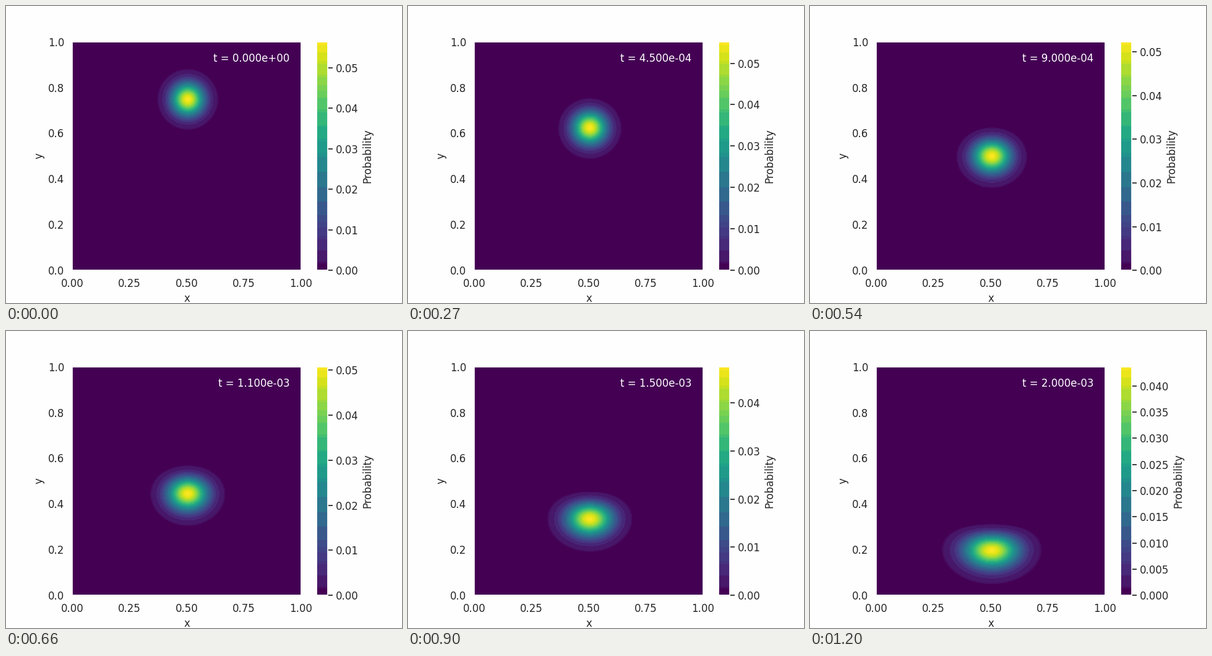
These frames come from a looping animation (640 by 480 pixels, 1.23 s). A matplotlib script:

```python
import numpy as np
import matplotlib.pyplot as plt
from matplotlib.animation import FuncAnimation
from matplotlib.colors import ListedColormap

FRAMES, INTERVAL = 41, 30
N, H, DT = 199, 0.005, 2.5e-5      # inner grid points, spacing, time step
STEPS_PER_FRAME = 2
SIGMA, MOMENTUM = 0.05, 200
PAPER, INK = "#fefefe", "0.15"

plt.rcParams.update({
    "font.family": "DejaVu Sans", "font.size": 12,
    "figure.facecolor": PAPER, "axes.edgecolor": PAPER,
    "axes.linewidth": 1.25, "axes.labelcolor": INK, "text.color": INK,
    "xtick.color": INK, "ytick.color": INK,
    "xtick.bottom": False, "ytick.left": False,
    "xtick.major.size": 6, "ytick.major.size": 6,
    "xtick.major.width": 1.25, "ytick.major.width": 1.25,
})


def banded_viridis():
    """Viridis reduced to the mean colour of each coarse RGB cell."""
    rgb = np.round(plt.get_cmap("viridis")(np.arange(256))[:, :3] * 255).astype(int)
    cells = rgb // [32, 16, 32]
    _, cell = np.unique(cells, axis=0, return_inverse=True)
    cell = cell.ravel()
    bands = np.array([rgb[cell == c].mean(axis=0) for c in cell])
    bands[cell == cell[0]] = rgb[0]
    return ListedColormap(bands / 255)


# Crank-Nicolson evolution of a free packet in a box, solved in the sine basis
mode = np.arange(1, N + 1)
sines = np.sqrt(2 / (N + 1)) * np.sin(np.pi * np.outer(mode, mode) / (N + 1))
energy = DT / H**2 * (1 - np.cos(np.pi * mode / (N + 1)))
u = energy[:, None] + energy[None, :]
step = (1 - 1j * u) / (1 + 1j * u)

pos = np.arange(N) * H
row, col = pos[:, None], pos[None, :]
psi0 = np.exp(-((col - 0.5)**2 + (row - 0.25)**2) / (2 * SIGMA**2)
              + 1j * MOMENTUM * row)
psi0 /= np.sqrt((np.abs(psi0)**2).sum())
coeffs = sines @ psi0 @ sines


def amplitude(i):
    return np.abs(sines @ (coeffs * step**(STEPS_PER_FRAME * i)) @ sines)


fig, ax = plt.subplots(figsize=(6.4, 4.8), dpi=100)
first = amplitude(0)
image = ax.imshow(first, extent=(0, 1, 0, 1), cmap=banded_viridis(),
                  vmin=0, vmax=first.max())
ax.set(xlabel="x", ylabel="y", xticks=np.linspace(0, 1, 5),
       yticks=np.linspace(0, 1, 6))
fig.colorbar(image, ax=ax, label="Probability")
clock = ax.text(0.95, 0.95, "", color="white", ha="right", va="top")


def update(i):
    field = amplitude(i)
    image.set_data(field)
    image.set_clim(0, field.max())
    clock.set_text(f"t = {i * STEPS_PER_FRAME * DT:.3e}")
    return image, clock


anim = FuncAnimation(fig, update, frames=FRAMES, interval=INTERVAL,
                     repeat=True, repeat_delay=0, blit=False)
plt.show()
```
